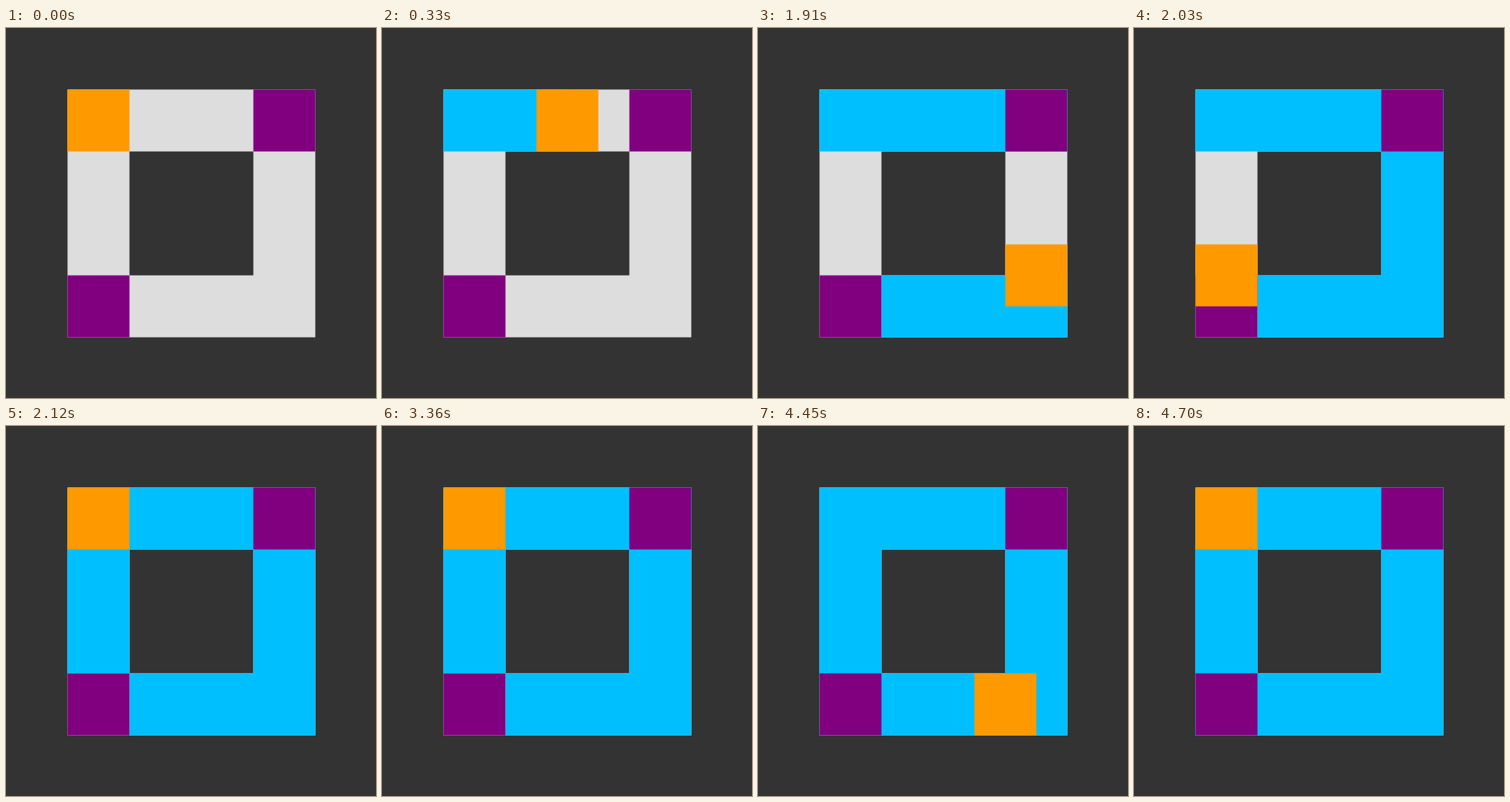
These frames come from a looping animation (442 by 442 pixels, 5180 ms). An HTML page with a canvas:

```html
<!DOCTYPE html>
<html lang="en">
<head>
<meta charset="utf-8">
<title>Portal slide</title>
<style>
html, body { margin: 0; width: 100%; height: 100%; overflow: hidden; background: #333; }
canvas { display: block; }
</style>
</head>
<body>
<canvas id="stage" width="442" height="442"></canvas>
<script>
const LOOP = 5180, SIZE = 442, CELL = 74, EDGE = 73.5;
const HALF = 3, TRIP = 2 * HALF; // cells to the portal, cells in a whole slide
const ctx = document.getElementById('stage').getContext('2d');

const portals = [[3, 0], [0, 3]];
const ring = [];
for (let i = 0; i < 16; i++) {
  const x = i % 4, y = i >> 2;
  if (x % 3 === 0 || y % 3 === 0) ring.push([x, y]);
}

const slides = [
  { begin: 270, end: 550, from: [0, 0], exit: portals[1], dir: [1, 0] },
  { begin: 1910, end: 2120, from: [3, 3], exit: portals[1], dir: [0, -1] },
  { begin: 3390, end: 3640, from: [0, 0], exit: portals[0], dir: [0, 1] },
  { begin: 4420, end: 4700, from: [3, 3], exit: portals[0], dir: [-1, 0] }
];

function place({ from, exit, dir }, dist) {
  const base = dist <= HALF ? from : exit;
  const d = dist <= HALF ? dist : dist - HALF;
  return base.map((v, i) => v + dir[i] * d);
}

// Moves one cell per step, starting half a cell in.
function travelled({ begin, end }, t) {
  const step = Math.floor((t - begin) / (end - begin) * TRIP);
  return Math.min(TRIP, step + 0.5);
}

// One path per colour, so neighbouring cells join without seams.
function fill(color, cells) {
  ctx.fillStyle = color;
  ctx.beginPath();
  for (const [x, y] of cells) ctx.rect(EDGE + x * CELL, EDGE + y * CELL, CELL, CELL);
  ctx.fill();
}

function draw(t) {
  let player = [0, 0];
  const painted = [];
  for (const slide of slides) {
    if (t < slide.begin) break;
    const dist = travelled(slide, t);
    for (let k = 0; k <= dist; k++) painted.push(place(slide, k));
    player = place(slide, dist);
  }

  ctx.fillStyle = '#333';
  ctx.fillRect(0, 0, SIZE, SIZE);
  fill('#ddd', ring);
  fill('#00bfff', painted);
  fill('#800080', portals);
  fill('#ff9900', [player]);
}

const start = performance.now();
function tick() {
  draw((performance.now() - start) % LOOP);
  requestAnimationFrame(tick);
}
tick();
</script>
</body>
</html>
```
